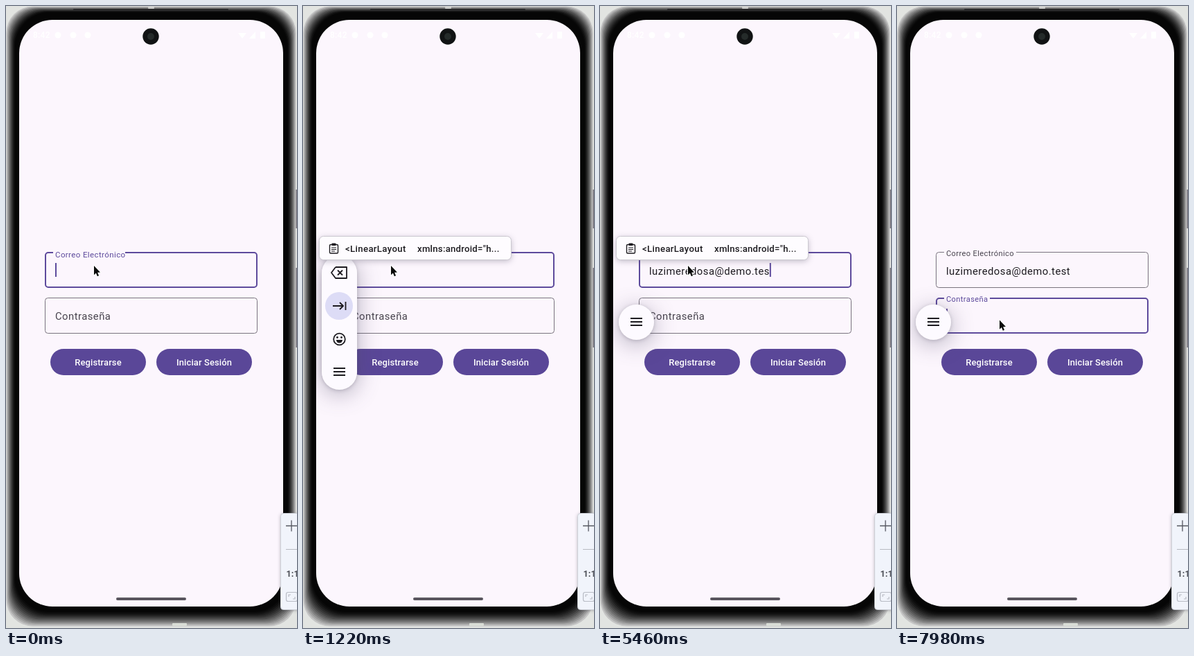
Animation of 420x898 px, one loop 8 s. Source, as an HTML page with a canvas:

```html
<!DOCTYPE html>
<html lang="es">
<head>
<meta charset="utf-8">
<title>Inicio de sesión</title>
<style>
html, body { margin: 0; width: 100%; height: 100%; overflow: hidden; background: #e2e4e1; }
canvas { display: block; width: 420px; height: 898px; }
</style>
</head>
<body>
<canvas id="stage"></canvas>
<script>
const LOOP = 8000;
const canvas = document.getElementById('stage');
const ctx = canvas.getContext('2d');
const dpr = window.devicePixelRatio || 1;
canvas.width = 420 * dpr;
canvas.height = 898 * dpr;

const SCREEN = '#fcf6fd', INK = '#1d1b20', MUTED = '#49454f', EDGE = '#79747e';
const ACCENT = '#5d4a9c', BUTTON = '#5a4798';
const EMAIL = 'luzimeredosa@demo.test';

// Key press times: a fast run, a pause before the sign, then the domain.
const keys = [...EMAIL].map((_, i) => {
  if (i < 10) return 1380 + 95 * i;
  if (i < 12) return 2560 + 140 * (i - 10);
  if (i === 12) return 3500;
  if (i < 21) return 4020 + 180 * (i - 13);
  return 5640;
});

const mix = (a, b, p) => a + (b - a) * p;
const ramp = (t, a, b) => Math.min(1, Math.max(0, (t - a) / (b - a)));
const ease = p => p * p * (3 - 2 * p);
const blink = since => since % 1000 < 500;

function box(x, y, w, h, r, fill, stroke, width = 1) {
  ctx.beginPath();
  ctx.roundRect(x, y, w, h, r);
  if (fill) { ctx.fillStyle = fill; ctx.fill(); }
  if (stroke) { ctx.strokeStyle = stroke; ctx.lineWidth = width; ctx.stroke(); }
}

function disc(x, y, r, fill) {
  ctx.beginPath();
  ctx.arc(x, y, r, 0, Math.PI * 2);
  ctx.fillStyle = fill;
  ctx.fill();
}

function lines(color, width, ...paths) {
  ctx.strokeStyle = color;
  ctx.lineWidth = width;
  ctx.beginPath();
  for (const p of paths) {
    ctx.moveTo(p[0], p[1]);
    for (let i = 2; i < p.length; i += 2) ctx.lineTo(p[i], p[i + 1]);
  }
  ctx.stroke();
}

function write(str, x, y, size, color, spacing = 0, weight = 400, align = 'left') {
  ctx.font = `${weight} ${size}px Roboto, sans-serif`;
  ctx.letterSpacing = spacing + 'px';
  ctx.textAlign = align;
  ctx.fillStyle = color;
  ctx.fillText(str, x, y);
  return ctx.measureText(str).width;
}

function shadowed(color, blur, dy, draw) {
  ctx.save();
  ctx.shadowColor = color;
  ctx.shadowBlur = blur * dpr;
  ctx.shadowOffsetY = dy * dpr;
  draw();
  ctx.restore();
}

// The metal rim darkens inward, in thin nested layers.
function rim() {
  const steps = 12;
  for (let i = 0; i <= steps; i++) {
    const p = i / steps;
    const x = mix(0.5, 13, p), y = mix(0.5, 9, p);
    const g = Math.round(mix(6, 196, (1 - p) ** 1.5));
    box(x, y, mix(418.5, 406.5, p) - x, mix(895.5, 875, p) - y, mix(38, 50, p), `rgb(${g},${g},${g})`);
  }
}

function phone() {
  ctx.fillStyle = '#e2e4e1';
  ctx.fillRect(0, 0, 420, 898);
  box(417, 265, 4, 56, 1, '#77747c');
  box(417, 378, 4, 115, 1, '#77747c');
  rim();
  box(97, 4, 224, 2.5, 1, '#2a2a2c');
  box(205, 1, 9, 3, 1, '#cfd0ce');
  box(240, 891, 21, 4, 1, '#d9ddd6');
  box(19, 20, 381, 847, 48, SCREEN);

  write('8:42', 39, 46, 12, '#ffffff', 0.3, 500);
  for (const x of [75, 97, 118]) disc(x, 42, 4.5, '#ffffff');
  ctx.beginPath();
  ctx.moveTo(341, 47); ctx.lineTo(335, 39); ctx.lineTo(347, 39);
  ctx.moveTo(351, 47); ctx.lineTo(360, 47); ctx.lineTo(360, 37);
  ctx.fillStyle = '#ffffff';
  ctx.fill();
  box(367, 37, 7, 10, 1, '#ffffff');

  disc(209, 44, 11.7, '#111314');
  disc(209, 44, 5, '#252b2a');
  box(159, 854, 101, 4, 2, '#59555e');
}

// The stroke stays inside the given box; gap is where the top edge resumes.
function outline(x, y, w, h, gap, color, width) {
  const r = 4, d = width / 2;
  const x1 = x + d, y1 = y + d, x2 = x + w - d, y2 = y + h - d;
  ctx.beginPath();
  ctx.moveTo(gap || x1 + r, y1);
  ctx.arcTo(x2, y1, x2, y2, r);
  ctx.arcTo(x2, y2, x1, y2, r);
  ctx.arcTo(x1, y2, x1, y1, r);
  ctx.arcTo(x1, y1, x2, y1, r);
  if (gap) ctx.lineTo(68, y1); else ctx.closePath();
  ctx.strokeStyle = color;
  ctx.lineWidth = width;
  ctx.stroke();
}

function field(y, label, gap, float, focus, value, caret) {
  outline(56, y, 307, 52, float > 0 ? gap : 0, focus ? ACCENT : EDGE, focus ? 2 : 1);
  write(label, 71, y + mix(31.5, 5.5, float), mix(14.83, 11.12, float),
    focus ? ACCENT : MUTED, mix(0.46, 0.37, float));
  const w = value ? write(value, 71, y + 32.5, 14.83, INK, 0.46) : 0;
  if (caret) {
    ctx.fillStyle = ACCENT;
    ctx.fillRect(71 + w, y + 16, 2, 20);
  }
}

function button(x, label) {
  box(x, 495, 138, 38, 19, BUTTON);
  write(label, x + 69, 519, 12.98, '#ffffff', 0.1, 500, 'center');
}

function menuIcon(y) {
  lines(INK, 1.9, [44, y - 5, 61, y - 5], [44, y, 61, y], [44, y + 5, 61, y + 5]);
}

function toolbar(open, alpha) {
  const top = mix(431, 360, open), bottom = mix(482, 554, open);
  ctx.save();
  ctx.globalAlpha = alpha;
  const shape = () => box(27, top, 51, bottom - top, 25.5, '#fdfaff');
  shadowed('rgba(80,75,105,.42)', 32, 6, shape);
  shadowed('rgba(70,66,85,.25)', 5, 1, shape);
  ctx.clip();

  ctx.globalAlpha = alpha * open;
  ctx.lineJoin = 'round';
  const a = mix(456, 385, open), b = mix(456, 433, open), c = mix(456, 481, open);
  lines(INK, 1.8, [47, a - 8, 63, a - 8, 63, a + 8, 47, a + 8, 41, a, 47, a - 8],
    [50, a - 3.5, 57, a + 3.5], [57, a - 3.5, 50, a + 3.5]);
  disc(52, b, 20, '#dddcf6');
  lines(INK, 1.8, [43, b, 58, b], [53, b - 5, 58, b, 53, b + 5], [61.5, b - 6, 61.5, b + 6]);
  ctx.beginPath();
  ctx.arc(52.5, c, 8.3, 0, Math.PI * 2);
  ctx.stroke();
  disc(49.5, c - 2.5, 1.4, INK);
  disc(55.5, c - 2.5, 1.4, INK);
  ctx.beginPath();
  ctx.arc(52.5, c + 1, 4.5, 0, Math.PI);
  ctx.fill();
  ctx.globalAlpha = alpha;
  menuIcon(mix(456, 528, open));
  ctx.restore();
}

function clipChip(y, alpha) {
  ctx.save();
  ctx.globalAlpha = alpha;
  shadowed('rgba(80,75,100,.35)', 9, 2, () => box(23.5, y, 277, 34, 6, '#fefcff'));
  box(23.5, y, 277, 34, 6, null, '#cbc8d0');
  box(38.5, y + 12, 12, 12.5, 1.5, null, INK, 1.4);
  box(41.5, y + 10, 6, 3.5, 1, INK);
  lines(INK, 1.2, [41, y + 16.5, 48, y + 16.5], [41, y + 19, 48, y + 19], [41, y + 21.5, 46, y + 21.5]);
  write('<LinearLayout', 61, y + 22.5, 13.2, INK, 0.35, 500);
  write('xmlns:android="h...', 165, y + 22.5, 13.2, INK, 0.25, 500);
  ctx.restore();
}

function zoomPanel() {
  shadowed('rgba(60,60,70,.4)', 5, 1, () => box(396.5, 732.5, 40, 139, 4, '#f1f4fb'));
  box(396.5, 732.5, 40, 139, 4, null, '#cfd2d9');
  lines('#55575f', 1.3, [404, 750.5, 420, 750.5], [412, 742.5, 412, 758.5]);
  lines('#b7bac2', 1, [404, 784.5, 420, 784.5]);
  write('1:1', 404.5, 823.5, 12.5, '#4c4e56', 0.2, 700);
  box(404.5, 846.5, 16, 13, 2.5, null, '#b9bcc5', 1.2);
  lines('#b9bcc5', 1.2, [408, 853, 408, 850, 411, 850], [417, 853, 417, 856, 414, 856]);
}

function pointer(x, y) {
  ctx.save();
  ctx.translate(x, y);
  ctx.scale(0.88, 0.92);
  ctx.beginPath();
  [[0, 0], [0, 14.5], [3.3, 11.5], [5.5, 16.7], [8, 15.6], [5.8, 10.6], [10.2, 10.3]]
    .forEach(p => ctx.lineTo(...p));
  ctx.closePath();
  ctx.lineJoin = 'round';
  ctx.strokeStyle = '#ffffff';
  ctx.lineWidth = 2.2;
  ctx.stroke();
  ctx.fillStyle = '#0a0a0a';
  ctx.fill();
  ctx.restore();
}

function draw(t) {
  ctx.setTransform(dpr, 0, 0, dpr, 0, 0);
  phone();

  const typed = keys.filter(k => k <= t).length;
  const lastKey = typed ? keys[typed - 1] : 0;
  const onPass = t >= 7620;
  const emailFloat = mix(0.89, 1, ramp(t, 0, 80));
  const passFloat = ease(ramp(t, 7620, 7790));
  field(355, 'Correo Electrónico', 172, emailFloat, !onPass,
    EMAIL.slice(0, typed), !onPass && blink(t - lastKey));
  field(421, 'Contraseña', 134, passFloat, onPass, '', onPass && blink(t - 7620));
  button(64, 'Registrarse');
  button(217, 'Iniciar Sesión');

  ctx.save();
  ctx.beginPath();
  ctx.roundRect(19, 20, 381, 847, 48);
  ctx.clip();
  const shown = ramp(t, 240, 380);
  if (shown > 0) {
    const open = ease(ramp(t, 380, 640)) * (1 - ease(ramp(t, 1300, 1520)));
    toolbar(open, shown);
  }
  const chip = ramp(t, 560, 700) * (1 - ramp(t, 7620, 7700));
  if (chip > 0) clipChip(mix(396, 332.5, ease(ramp(t, 860, 1060))), chip);
  ctx.restore();

  zoomPanel();
  const move = ease(ramp(t, 6780, 7400));
  pointer(mix(127, 148, move), mix(375, 453.5, move));
}

function tick(now) {
  draw(now % LOOP);
  requestAnimationFrame(tick);
}
draw(0);
requestAnimationFrame(tick);
</script>
</body>
</html>
```
